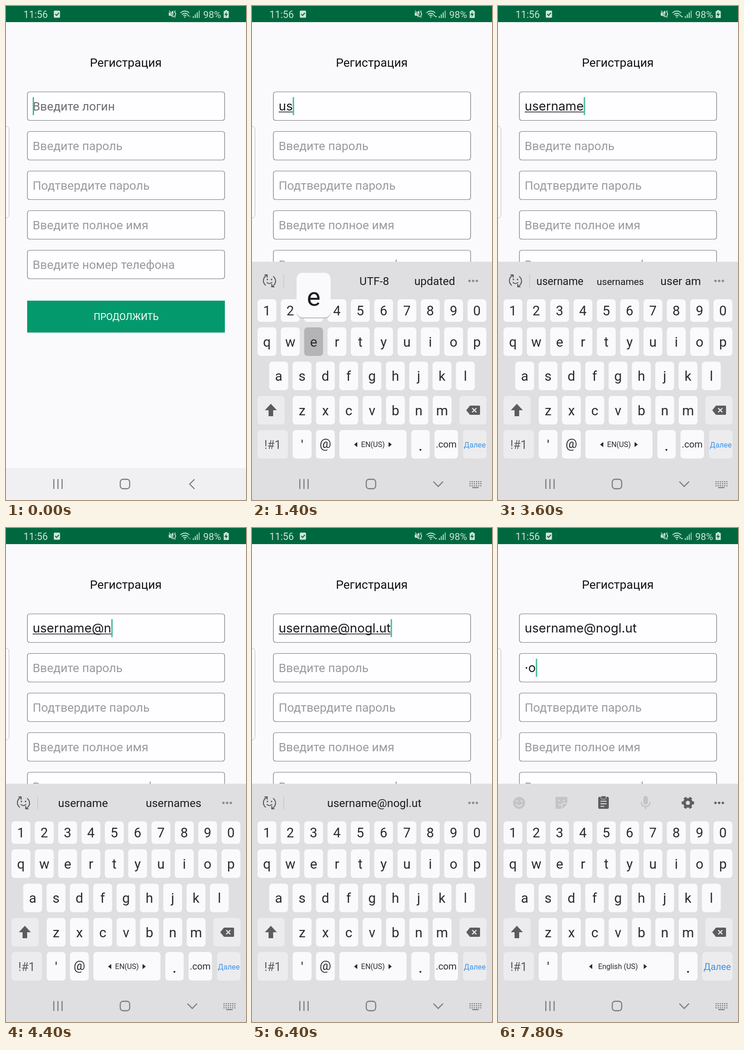
Animation of 522 by 1073 pixels, one loop 8000 ms. Source, as an HTML page:

```html
<!DOCTYPE html>
<html lang="ru">
<head>
<meta charset="utf-8">
<title>Регистрация</title>
<style>
html, body { margin: 0; width: 100%; height: 100%; overflow: hidden; background: #faf9fc; }
svg { display: block; width: 522px; height: 1073px; font-family: Roboto, sans-serif; }
.typed { font-family: Inter, "Open Sans", sans-serif; }
</style>
</head>
<body>
<svg id="stage" viewBox="0 0 522 1073"></svg>
<script>
const LOOP = 8000, STEP = 200;
const BOARD = '#dfdee0', KEY = '#faf9fc', SIDE = '#ecebed', INK = '#2b2a2d', GREY = '#5c5b5e';
const TYPED_SIZE = 27.3, WORD_SIZE = 24.4;
const HINTS = ['Введите логин', 'Введите пароль', 'Подтвердите пароль', 'Введите полное имя', 'Введите номер телефона'];
const LOGIN = 'username@nogl.ut';
const pen = document.createElement('canvas').getContext('2d');

// Each beat changes part of the state; a pressed key lasts one beat only.
const beats = [
  [0, { login: '', pass: '', focus: 0, words: [], wifi: 0, drop: 600, caret: 1 }],
  [200, { drop: 330 }],
  [400, { drop: 60 }],
  [600, { drop: 0, wifi: 1 }],
  [1000, { key: 'u' }],
  [1200, { login: 1, key: 's', words: ['us', 'UTF-8', 'updated'] }],
  [1400, { login: 2, key: 'e' }],
  [1600, { login: 3, key: 'r', words: ['use', 'user', 'used'] }],
  [1800, { login: 4 }],
  [2000, { words: ['used', 'users', 'user'] }],
  [2400, { key: 'n' }],
  [2600, { login: 5 }],
  [2800, { login: 6, key: 'm' }],
  [3000, { login: 7, key: 'e' }],
  [3200, { login: 8 }],
  [3400, { words: ['username', 'usernames', 'user am'] }],
  [3800, { caret: 0 }],
  [4000, { caret: 1, login: 9, words: ['username', 'usernames'] }],
  [4200, { key: 'n' }],
  [4400, { login: 10, wifi: 2 }],
  [4600, { key: 'o' }],
  [4800, { login: 11 }],
  [5000, { key: 'g' }],
  [5200, { login: 12, key: 'l' }],
  [5400, { login: 13 }],
  [5600, { login: 14 }],
  [5800, { key: 'u', words: [] }],
  [6000, { login: 16 }],
  [6400, { words: [LOGIN], wifi: 1 }],
  [6600, { key: 'Далее' }],
  [6800, { focus: 1, words: [] }],
  [7200, { caret: 0 }],
  [7400, { caret: 1, key: 'i' }],
  [7600, { pass: 'i', key: 'o' }],
  [7800, { pass: '·o' }],
];

function stateAt(time) {
  const state = {};
  for (const [start, change] of beats) {
    if (start > time) break;
    Object.assign(state, change);
    state.key = start + STEP > time ? change.key : undefined;
  }
  state.login = LOGIN.slice(0, state.login || 0);
  return state;
}

const rect = (x, y, w, h, r, fill, extra = '') =>
  `<rect x="${x}" y="${y}" width="${w}" height="${h}" rx="${r}" fill="${fill}" ${extra}/>`;
const text = (x, y, size, str, fill, extra = 'text-anchor="middle"') =>
  `<text x="${x}" y="${y}" font-size="${size}" fill="${fill}" ${extra}>${str}</text>`;
const line = (d, color, width = 2, extra = '') =>
  `<path d="${d}" fill="none" stroke="${color}" stroke-width="${width}" ${extra}/>`;
const shape = (d, fill) => `<path d="${d}" fill="${fill}"/>`;
const dot = (x, y, r, fill) => `<circle cx="${x}" cy="${y}" r="${r}" fill="${fill}"/>`;

function widthOf(str, size, family) {
  pen.font = `${size}px ${family}`;
  return pen.measureText(str).width;
}

function statusBar(wifi) {
  const c = '#cfe4da', up = 'M394 22l2.500-3 2.500 3z', down = 'M397.500 22h5l-2.500 3z';
  return rect(0, 0, 522, 35, 0, '#00683f') +
    text(38, 25.5, 21.3, '11:56', c, '') + text(429, 25.5, 21, '98%', c, '') +
    rect(104, 10, 13.5, 15.5, 2, c) + line('M107 17.500l3 3 5-5.500', '#00683f') +
    shape('M354 14h4l6-4v15l-6-4h-4z', c) + line('M355 10l11 15', '#00683f', 3) +
    line('M355 10l10 14', c, 1.5) + line('M368 10q-2 2.500 0 5t0 5 0 5', c, 1.8) +
    line('M379.500 15q9.500-8 19 0M382.500 18.500q6.500-5.500 13 0M385.500 21.500q3.500-3 7 0', c, 1.8) +
    dot(389, 24, 1.5, c) +
    `<g opacity="${wifi == 2 ? 0.45 : 1}">` + shape(up, c) + `<g opacity="${wifi ? 1 : 0.4}">` + shape(down, c) + '</g></g>' +
    [0, 1, 2, 3].map(i => rect(406.5 + i * 4.2, 22 - i * 4, 2, 4 + i * 4, 0, c, i == 3 ? 'opacity=".8"' : '')).join('') +
    shape('M473.500 11h3v-2h5v2h3v15h-11z', c) + shape('M480 12l-5 7.500h3.500l-1 5 5-7.500h-3.500z', '#00683f');
}

function field(i, s) {
  const y = 186.5 + i * 86, value = [s.login, s.pass][i] || '', focused = s.focus == i;
  const end = 58 + (value ? widthOf(value, TYPED_SIZE, 'Inter, "Open Sans", sans-serif') : 0);
  let out = rect(46.5, y, 429, 62, 5, '#fefdff', 'stroke="#77767a" stroke-width="1.2"');
  out += value
    ? text(58, y + 40.5, TYPED_SIZE, value, '#171619', 'class="typed"')
    : text(58, y + 40.5, 26.1, HINTS[i], focused ? '#6c6b6e' : '#9b9a9d', '');
  if (value && focused && i == 0) out += rect(58, y + 43, end - 58, 1.5, 0, '#171619');
  if (focused && s.caret) out += rect(end, y + 11.5, 3, 39, 0, '#45bd98');
  return out;
}

function page(s) {
  return rect(0, 0, 522, 1073, 0, '#faf9fc') + statusBar(s.wifi) +
    text(260.5, 132, 26.1, 'Регистрация', '#111') +
    rect(-20, 261, 26.5, 199.5, 7, '#fcfbfe', 'stroke="#b9b8bb"') +
    HINTS.map((_, i) => field(i, s)).join('') +
    rect(46, 642, 430, 69, 1, '#d9dcdb') + rect(46, 640, 430, 69, 0, '#04996d') +
    text(261.5, 681.5, 20.3, 'ПРОДОЛЖИТЬ', '#fff');
}

function toolbar() {
  const pale = '#c4c3c5', dark = '#5d5c5f';
  return dot(46, 597, 13, pale) + dot(41, 593, 2, BOARD) + dot(51, 593, 2, BOARD) +
    line('M39 600q7 8 14 0', BOARD, 2.5) +
    shape('M127 584h22q2 0 2 2v13l-11 11h-13q-2 0-2-2v-22q0-2 2-2z', pale) +
    line('M151 598h-9q-3 0-3 3v9', BOARD, 2) + dot(133, 592, 1.8, BOARD) + dot(143, 592, 1.8, BOARD) +
    line('M131 599q3 4 7 2', BOARD, 2) +
    rect(218, 584, 23, 26, 3, dark) + rect(224, 582, 11, 7, 2, dark, `stroke="${BOARD}"`) +
    line('M223 593.500h13M223 599h13M223 604.500h8', BOARD, 2.2) +
    rect(316, 582, 10, 19, 5, pale) + line('M311.500 595q0 10 9.500 10t9.500-10M321 605v6', pale, 2.5) +
    dot(413, 597, 10.5, dark) +
    `<circle cx="413" cy="597" r="11" fill="none" stroke="${dark}" stroke-width="5" pathLength="12" stroke-dasharray="1 1" stroke-dashoffset=".5"/>` +
    dot(413, 597, 4.5, BOARD);
}

function suggestions(words) {
  const slot = 394 / words.length;
  return line('M30 607q-8-7-4-16 2-4 6-6M46 587q8 7 4 16-2 4-6 6', GREY, 2.2) +
    line('M27 584h6v6M49 610h-6v-6', GREY, 2.2) +
    dot(33.5, 594, 1.7, GREY) + dot(42.5, 594, 1.7, GREY) + line('M32 600q6 6 12 0', GREY, 2) +
    rect(68.5, 583, 1, 28, 0, '#bbbabd') +
    words.map((word, i) => {
      const shrink = Math.min(1, (slot - 29) / widthOf(word, WORD_SIZE, 'Roboto, sans-serif'));
      return text(69 + slot * (i + 0.5), 606, WORD_SIZE * shrink, word, '#1d1c1f');
    }).join('');
}

function keyboard(s) {
  let out = rect(0, 555.5, 522, 520, 0, BOARD), bubble = '';

  const key = (x, y, w, label, size = 29.5, base = 41.5, fill = KEY, color = INK, h = 62) => {
    const pressed = s.key && label == s.key;
    out += rect(x, y, w, h, 7, pressed ? '#b4b3b5' : fill) + text(x + w / 2, y + base, size, label, color);
    if (pressed && label.length == 1) {
      const left = x + w / 2 - 37, top = y - 118.5;
      bubble = rect(left, top + 1, 74, 98, 13, '#b9b8bb') + rect(left, top, 74, 97, 13, KEY) +
        text(left + 37, top + 71, 56, label, '#1d1c1f');
    }
  };
  const row = (chars, x, y, ...rest) => [...chars].forEach((c, i) => key(x + i * 50.75, y, 41, c, ...rest));

  out += s.words.length ? suggestions(s.words) : toolbar();
  for (const x of [473, 481, 489]) out += dot(x, 597, 2.6, s.words.length ? '#89888b' : GREY);

  row('1234567890', 12, 637, 29, 35, KEY, INK, 49);
  row('qwertyuiop', 12, 698);
  row('asdfghjkl', 37.5, 772.5);
  row('zxcvbnm', 88.5, 847);
  key(12, 847, 59, '', 0, 0, SIDE);
  out += shape('M41 864l13 14h-8v13h-10v-13h-8z', GREY);
  key(451, 847, 59, '', 0, 0, SIDE);
  out += shape('M474 868h20q2 0 2 2v16q0 2-2 2h-20l-8-10z', GREY) + line('M479 873.500l9 9m0-9l-9 9', SIDE, 2.4);

  key(12, 921, 66, '!#1', 25.5, 40.5, SIDE, GREY);
  key(88.5, 921, 41, "'", 29.5, 43);
  const secret = s.focus == 1;
  const [left, width, middle, arm] = secret ? [139, 244, 261, 59] : [190, 146, 263, 37];
  if (!secret) key(139, 921, 41, '@', 28, 39);
  key(left, 921, width, '');
  out += text(middle, 958, 16, secret ? 'English (US)' : 'EN(US)', INK) +
    shape(`M${middle - arm - 4} 952.500l7-5.500v11zM${middle + arm + 4} 952.500l-7-5.500v11z`, INK);
  key(secret ? 393 : 346.5, 921, secret ? 41 : 40, '.', 36, 45);
  if (!secret) key(397, 921, 51, '.com', 20.3, 38);
  key(secret ? 444 : 459, 921, secret ? 66 : 51, 'Далее', secret ? 20.3 : 16.2, secret ? 38.5 : 37.5, SIDE, '#3b95ea');
  return out + bubble;
}

function navBar(open) {
  const c = '#7b7a7d';
  let out = rect(0, 1004, 522, 69, 0, open ? BOARD : '#f0eff1') +
    line('M104 1027.500v21.500M113 1027.500v21.500M122 1027.500v21.500', c, 2.3) +
    rect(248.5, 1028, 20.5, 20.5, 6, 'none', `stroke="${c}" stroke-width="2.3"`) +
    line(open ? 'M394.500 1033l10.500 10.500 10.500-10.500' : 'M410 1028l-10.500 10.500 10.500 10.500', c, 2.3);
  if (open) {
    for (const y of [1032, 1036.5, 1041])
      for (let i = 0; i < 6; i++) out += rect(473 + i * 4.7, y, 2.4, 2.4, 0, c);
    out += rect(479, 1045, 14, 2.2, 0, c);
  }
  return out;
}

function draw(time) {
  const s = stateAt(time), open = s.drop < 600;
  stage.innerHTML = page(s) +
    (open ? `<g transform="translate(0 ${s.drop})">${keyboard(s)}</g>` : '') + navBar(open);
}

const stage = document.getElementById('stage');
const origin = performance.now();
let shown = -1;
function tick() {
  const step = Math.floor((performance.now() - origin) % LOOP / STEP);
  if (step != shown) draw((shown = step) * STEP);
  requestAnimationFrame(tick);
}
tick();
</script>
</body>
</html>
```
